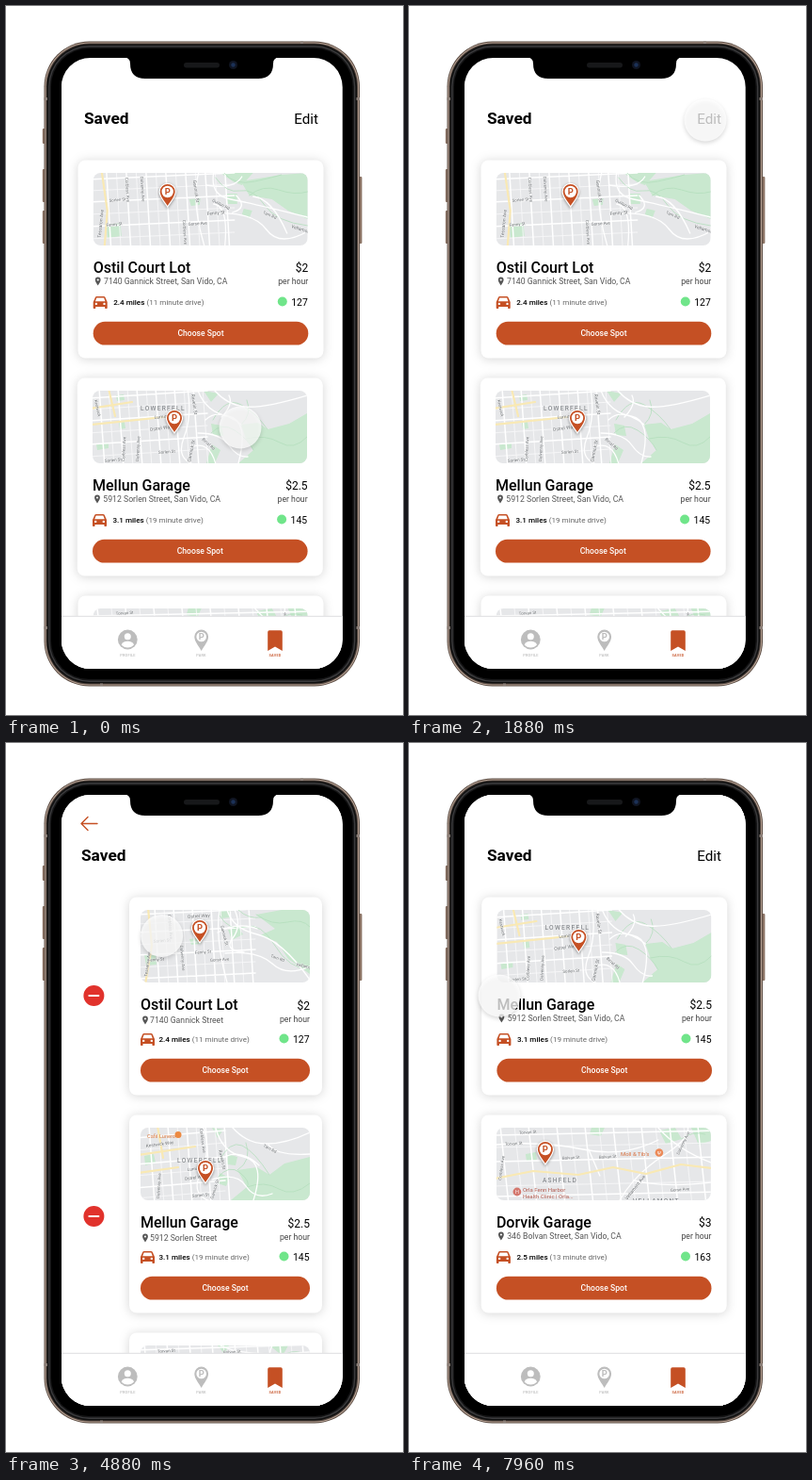
Recreate the animation shown at these times as an HTML page. Size 422 by 752 pixels, loop 8 s.

```html
<!DOCTYPE html>
<html lang="en">
<head>
<meta charset="utf-8">
<title>Saved parking</title>
<style>
html, body { margin: 0; width: 100%; height: 100%; overflow: hidden; background: #fff; }
svg { display: block; width: 100vw; height: 100vh; font-family: Roboto, Arial, sans-serif; }
.card { fill: #fff; filter: drop-shadow(0 1.5px 5.5px rgba(0,0,0,.17)); }
.pin { filter: drop-shadow(0 1px 1.5px rgba(0,0,0,.4)); }
.touch { filter: drop-shadow(0 2px 2px rgba(0,0,0,.2)); }
</style>
</head>
<body>
<svg id="stage" viewBox="0 0 422 752"></svg>
<script>
const ORANGE = '#c55024', GRAY = '#bdbdbd', PARK = '#c9e8cf', LOOP = 8000;

const text = (s, x, y, size, fill = '#000', extra = '') =>
  `<text x="${x}" y="${y}" font-size="${size}" fill="${fill}" ${extra}>${s}</text>`;
const box = (x, y, w, h, r, fill, extra = '') =>
  `<rect x="${x}" y="${y}" width="${w}" height="${h}" rx="${r}" fill="${fill}" ${extra}/>`;
const dot = (x, y, r, fill, extra = '') => `<circle cx="${x}" cy="${y}" r="${r}" fill="${fill}" ${extra}/>`;
const path = (d, fill, extra = '') => `<path d="${d}" fill="${fill}" ${extra}/>`;
const line = (d, color, width) =>
  path(d, 'none', `stroke="${color}" stroke-width="${width}" stroke-linejoin="round" stroke-linecap="round"`);
const at = (x, y, body, extra = '') => `<g transform="translate(${x} ${y})" ${extra}>${body}</g>`;
const END = 'text-anchor="end"', MID = 'text-anchor="middle"', MEDIUM = 'font-weight="500"', BOLD = 'font-weight="700"';

// ---- icons ----
const drop = (r, tip) => `M${-r} 0A${r} ${r} 0 1 1 ${r} 0C${r} ${r * .65} ${r * .4} ${tip * .65} 0 ${tip}C${-r * .4} ${tip * .65} ${-r} ${r * .65} ${-r} 0Z`;
const parkPin = (r, tip, color, extra) =>
  path(drop(r, tip), color, extra) + dot(0, 0, r * .72, '#fff') + text('P', 0, 3.4, 9.4, color, `${MID} ${BOLD}`);
const marker = (x, y) => at(x, y, parkPin(8.6, 16, ORANGE, 'stroke="#fff" stroke-width="1.2"'), 'class="pin"');
const smallPin = (x, y) => at(x, y, path(drop(2.9, 6), '#555') + dot(0, 0, 1.1, '#fff'));
const car = (x, y) => at(x, y,
  path('M0 6 2.2 1Q2.6 0 3.8 0H11.2Q12.4 0 12.8 1L15 6V12.2Q15 13 14.2 13H13.2Q12.4 13 12.4 12.2V11H2.6V12.2Q2.6 13 1.8 13H.8Q0 13 0 12.2Z', ORANGE) +
  path('M2.2 5.2 3.6 1.5H11.4L12.8 5.2Z', '#fff') + dot(3.2, 7.9, 1.2, '#fff') + dot(11.8, 7.9, 1.2, '#fff'));
const minus = (x, y) => dot(x, y, 11, '#e1322c') + box(x - 6, y - 1, 12, 2, 1, '#fff');

// ---- maps, each drawn in a 77 px high strip ----
const label = (s, x, y, turn = 0, size = 4.5, fill = '#62666a') =>
  text(s, x, y, size, fill, `transform="rotate(${turn} ${x} ${y})" stroke="#fff" stroke-width=".8" stroke-opacity=".7" paint-order="stroke"`);
const district = (s, x, y) => text(s, x, y, 6.6, '#74787c', 'letter-spacing="1.3"');

function grid(from, to, gap, tilt, rows, slope) {
  let minor = '', major = '';
  for (let x = from, i = 0; x < to; x += gap, i++) {
    const d = `M${x} -3l${tilt} 84`;
    i % 2 ? minor += d : major += d;
  }
  rows.forEach((y, i) => {
    const d = `M-5 ${y}L${to} ${y + slope}`;
    i % 2 ? minor += d : major += d;
  });
  return line(minor, '#f8f8f9', .9) + line(major, '#fff', 1.5);
}
const map = (w, parks, trails, streets, roads, main, labels, pin) => at(0, 0,
  box(0, 0, w, 77, 0, '#e6e7e9') + path(parks, PARK) + streets + line(trails, '#b4dfbd', .8) + line(roads, '#fff', 1.3) +
  line(main, '#f9e9b4', 2.2) + labels + marker(...pin), `clip-path="url(#clip${w})"`);

const maps = {
  courtWide: map(228,
    'M135 0H170L158 13 150 10ZM157 9L200 2 228 0V49L207 40 190 28 166 24ZM14 55L29 53 30 67 15 69ZM102 28L114 27 113 34 104 35ZM142 22H153V33H143ZM160 38L169 40 166 48 158 44Z',
    'M130 5Q142 22 156 19T182 34 228 56M166 24Q180 12 197 18T228 20M139 0Q150 14 172 9T200 2',
    grid(14, 150, 10.5, 5, [7, 19, 31, 44, 57, 70], -7),
    'M112 0Q104 30 118 77M128 0Q124 24 146 28T228 47M120 13Q150 18 158 4M130 43Q170 41 184 60T228 62M152 24Q165 37 148 42M170 25Q190 27 206 64M128 33Q144 35 140 77',
    'M9 -2 15 40 12 79',
    label('Tessaron Ave', 8, 69, -84, 5) + label('Sorlen St', 17, 31, -5) + label('Fenny St', 14, 57, -6) +
    label('Fenny St', 121, 45, -5, 5) + label('Gorse Ave', 101, 56, -4) + label('Corbless Ave', 34, 5, 86) +
    label('Dalvenny Ave', 50, 4, 86) + label('Gannick St', 106, 8, 82, 5) + label('Corbless Ave', 95, 50, 86) +
    label('Vellamont', 210, 58, 18, 5) + label('Tarn Rd', 180, 43, 24) + label('Quillon Rd', 126, 30, 28),
    [79, 20]),

  courtNarrow: map(180,
    'M123 5L150 0H180V68L157 52 145 34 127 27 143 20ZM84 0H96V8L85 9ZM93 21L104 19 109 26 97 32ZM4 48L16 46 17 58 6 59ZM52 31L65 29 64 36 54 37Z',
    'M84 6Q94 23 111 18T143 38 180 63M123 5Q140 17 156 13T180 18M104 0Q114 10 128 8',
    grid(15, 122, 10, 5, [5, 15, 24, 37, 48, 61, 73], -6),
    'M84 0Q79 30 92 77M92 0Q98 20 124 26T180 74M82 24Q102 12 124 20M90 46Q125 43 140 57T180 60M100 0Q108 17 98 30T110 45',
    'M8 -2 12 38 5 79',
    label('Ostrel Way', 50, 9, -4, 5) + label('Tessaron Ave', 7, 71, -82, 4.6) + label('Sorlen St', 14, 35, -5) +
    label('Fenny St', 58, 47, -5) + label('Fenny St', 8, 55, -5) + label('Gorse Ave', 74, 55, -4) +
    label('Gannick St', 85, 17, 76) + label('Corbless Ave', 29, 5, 85) + label('Dalvenny Ave', 42, 38, 85) +
    label('Vellamont', 165, 59, 14) + label('Tarn Rd', 138, 50, 20),
    [63, 19]),

  garageWide: map(228,
    'M158 36L176 34 186 41 209 35 228 24V77H155L171 63 163 51ZM118 0L134 3 126 12ZM126 35L137 37 139 48 128 47ZM25 5L33 4 34 10 26 11ZM28 34L34 33 35 40 29 41ZM4 57L17 55 17 61 5 63ZM127 57L136 63 130 77 121 77Z',
    'M128 31Q142 6 158 15T186 41M126 45Q137 33 151 42T171 63M158 36Q170 25 164 10M163 51Q184 46 199 55T228 49',
    grid(7, 122, 10, 6, [8, 20, 32, 45, 57, 70], -8),
    'M101 -2Q106 27 97 50T110 79M112 0Q121 23 144 27T155 77M120 31Q134 17 158 36M112 45Q136 45 145 58T165 70M130 0Q143 15 162 17T228 5M104 60Q124 52 131 78M145 5Q150 15 137 28',
    'M-2 19L42 12M17 -2 24 27M-2 36L76 28',
    label('Lumis St', 66, 30, -6, 5) + district('LOWERFELL', 51, 21) + label('Ostrel Way', 61, 43, -8, 5) +
    label('Ravelin St', 105, 4, 82, 5) + label('Gannick St', 104, 76, -78, 5) + label('Sorlen St', 70, 67, -4) +
    label('Corbless Ave', 34, 75, -87) + label('Dalvenny Ave', 49, 75, -87) + label('Sorlen St', 13, 76, -5) +
    label('Birral Rd', 116, 52, 42) + label('Kestwick', 2, 10, 78),
    [87, 29]),

  garageNarrow: map(180,
    'M103 45L124 42 137 50 153 38 180 31V77H96L113 63ZM76 0L88 2 82 11ZM93 28L103 31 101 40 92 39ZM4 30L14 28 16 37 5 40ZM84 48L95 53 91 62 82 59Z',
    'M83 36Q95 13 108 19T137 50M82 53Q94 38 106 48T113 63M103 45Q119 35 112 16M113 63Q132 56 147 65T180 59',
    grid(9, 90, 10, 6, [11, 24, 39, 51, 64, 75], -8),
    'M66 -2Q76 24 64 48T77 79M80 0Q86 26 110 31T119 80M80 37Q103 18 126 40M76 55Q102 47 112 62T140 70M98 0Q113 17 134 17T180 5M136 18Q144 30 180 28',
    'M-2 29L58 20M18 -2 24 32M-2 48 40 42',
    text('Café Lunero', 7, 11, 5.6, '#d9783f') + dot(40, 7.5, 3.5, '#ec8a42') + label('Kestwick Way', 6, 21, -8, 4.8) +
    district('LOWERFELL', 39, 37) + label('Lumis St', 50, 46, -6, 4.8) + label('Ostrel Way', 47, 56, -8, 4.8) +
    label('Ravelin St', 83, 24, 78, 4.8) + label('Corbless Ave', 63, 1, 83) + label('Dalvenny Ave', 20, 75, -86) +
    label('Sorlen St', 55, 74, -5) + label('Gannick St', 77, 76, -72) + label('Tarn Rd', 130, 20, 28),
    [69, 43]),

  thirdWide: map(228,
    'M101 0H115L111 9 99 7ZM173 3L190 0 197 12 180 17ZM207 0H228V14L215 18ZM31 28L42 26 43 34 32 35Z',
    'M197 12Q208 3 222 7',
    grid(4, 235, 15, 9, [8, 21, 36, 62, 73], -5),
    'M130 79Q146 50 177 30T203 -2M172 0Q192 23 228 37M0 18Q49 14 92 23T172 13M146 56Q178 64 230 58M98 23 110 51',
    'M-2 54 39 46 87 50 124 42 159 49 196 39 230 43',
    label('Torvan St', 9, 19, -4) + label('Torvan St', 24, 7, -4) + label('Bolvan St', 70, 34, -4) +
    label('Bolvan St', 109, 33, -4) + label('Vellamont Ave', 139, 77, -52, 5) + label('Corbless Ave', 5, 56, -82) +
    label('Dalvenny Ave', 194, 29, -64) + label('Gorse Ave', 185, 68, -5) + district('ASHFELD', 49, 57.5) +
    district('VELLAMONT', 145, 80) + text('Moll &amp; Tib’s', 132, 30, 6, '#d8703f') + dot(173, 26.5, 4.3, '#ec8a58') +
    text('Ψ', 173, 29, 5.5, '#fff', MID) + text('Orla Fenn Harbor', 28, 68, 6, '#b25b50') +
    text('Health Clinic | Orla...', 28, 75, 6, '#b25b50') + dot(22, 68, 4.4, '#d4776d') + text('H', 22, 70, 5.5, '#fff', MID),
    [52, 23]),

  thirdNarrow: map(180,
    'M82 0H94L89 9ZM137 0H157L151 11Z', 'M151 11Q160 4 172 8',
    grid(4, 185, 12, 7, [5, 19, 34], -6), 'M85 0Q109 13 180 7M140 0Q135 9 139 20', 'M-2 55 182 43',
    label('Torvan St', 18, 8, -4) + label('Bolvan St', 88, 9, -4), [41, 48])
};

// ---- cards ----
const spots = [
  { name: 'Ostil Court Lot', street: '7140 Gannick Street', price: '$2', miles: '2.4', mins: 11, free: 127, map: 'court' },
  { name: 'Mellun Garage', street: '5912 Sorlen Street', price: '$2.5', miles: '3.1', mins: 19, free: 145, map: 'garage' },
  { name: 'Dorvik Garage', street: '346 Bolvan Street', price: '$3', miles: '2.5', mins: 13, free: 163, map: 'third' }
];

function card(spot, row, narrow, dx = 0) {
  const w = narrow ? 180 : 228, left = narrow ? 143 : 92.7, right = narrow ? 323 : 321.3;
  const low = narrow ? 2 : 0, frame = narrow ? [131, 205] : [76.5, 261];
  return at(dx, row * 231,
    box(frame[0], 163.5, frame[1], 210, 8, '#fff', 'class="card"') +
    at(left, 177, maps[spot.map + (narrow ? 'Narrow' : 'Wide')]) +
    text(spot.name, left, 283, 16, '#000', MEDIUM) +
    smallPin(left + 5, 290.5 + low) +
    text(spot.street + (narrow ? '' : ', San Vido, CA'), left + (narrow ? 10 : 11.3), 295 + low, 8.7, '#555') +
    text(spot.price, right, 282 + low / 2, 12, '#000', END) +
    text('per hour', right, 295 + low / 2, 8.7, '#444', END) +
    car(left, 308) +
    text(`${spot.miles} miles <tspan fill="#666" font-weight="400">(${spot.mins} minute drive)</tspan>`,
      left + (narrow ? 19.5 : 21.5), 317, 8.1, '#000', MEDIUM) +
    dot(right - 27.5, 313.5, 5, '#70e58a') + text(spot.free, right - .5, 317.5, 10.4, '#000', END) +
    box(left, 334.8, right - left, 24.8, 12.4, ORANGE) +
    text('Choose Spot', (left + right) / 2, 350.4, 8.6, '#fff', `${MID} ${MEDIUM}`));
}

const page = box(59, 55, 299, 649, 0, '#fff');
const saved = x => text('Saved', x, 125, 17.3, '#000', BOLD);
const edit = text('Edit', 332, 125, 15.2, '#000', END);
const listView = page + saved(83) + edit +
  card(spots[0], 0, false) + card(spots[1], 1, false, -.7) + card(spots[2], 2, false);
const editView = page + saved(80) + line('M97 85.5H80M87 78.5 80 85.5 87 92.5', ORANGE, 1.4) +
  spots.map((s, i) => card(s, i, true)).join('') + minus(93.4, 268) + minus(93.4, 502);
const resultView = page + saved(83) + edit + card(spots[1], 0, false, .7) + card(spots[2], 1, false, .2);

const tab = (s, x, color) => text(s, x, 690, 3.9, color, `${MID} ${MEDIUM} letter-spacing=".2"`);
const tabBar = box(59, 647, 299, 60, 0, '#fff') + box(59, 646.8, 299, .9, 0, '#d9d9dc') +
  dot(129.3, 672, 10.4, GRAY) + dot(129.3, 668.8, 3.5, '#fff') + path('M122.7 677.5Q124 673.8 129.3 673.8T136 677.5Q133.5 680.5 129.3 680.5T122.7 677.5Z', '#fff') +
  at(207.7, 669, parkPin(7.4, 15, GRAY, '')) +
  path('M278.2 664Q278.2 662.3 280 662.3H292Q293.8 662.3 293.8 664V684L286 679.5 278.2 684Z', ORANGE) +
  tab('PROFILE', 129.5, GRAY) + tab('PARK', 207.5, GRAY) + tab('SAVED', 286, ORANGE);

// ---- phone: nested shells, each an inset and a colour ----
const shells = [[0, '#57483f'], [.9, '#b7a294'], [2, '#4a3f39'], [3, '#111'], [4.6, '#3b3b3d'], [6, '#161617'], [7.5, '#000']];
const body = [[38.8, 130, 16], [38.8, 173, 35], [38.8, 217, 35], [375, 181, 71]]
  .map(([x, y, h]) => box(x, y, 3.4, h, 1, '#8b7364')).join('') +
  shells.map(([inset, fill]) =>
    box(40.5 + inset, 37.5 + inset, 335.5 - 2 * inset, 684 - 2 * inset, 48 - inset, fill)).join('') +
  [[40.5, 97], [372.5, 97], [40.5, 658], [372.5, 658]].map(([x, y]) => box(x, y, 3.5, 3, 0, '#8c8079')).join('') +
  box(100, 718.5, 3, 2.5, 0, '#8c8079') + box(313, 37.5, 3, 2.5, 0, '#8c8079');
const notch = path('M126 54.5Q132 55 132 61Q132 77 148 77H268Q284 77 284 61Q284 55 290 54.5Z', '#000') +
  box(189, 60, 38, 5.5, 2.7, '#17181a') + dot(241.5, 62.5, 4.5, '#101522') + dot(241.5, 62.5, 2.2, '#1c3157');

const clip = (id, x, y, w, h, r) => `<clipPath id="${id}">${box(x, y, w, h, r, '#000')}</clipPath>`;
const stage = document.getElementById('stage');
stage.innerHTML = `<defs>${clip('clip228', 0, 0, 228, 77, 8) + clip('clip180', 0, 0, 180, 77, 8) + clip('screen', 58.7, 55, 299, 648, 31)}</defs>` +
  body + `<g clip-path="url(#screen)">${listView}<g id="editing">${editView}</g><g id="result">${resultView}</g>${tabBar}</g>` + notch +
  '<g id="touch"><circle class="touch" r="22.5" fill="#fff" fill-opacity=".74"/></g>';

// ---- motion ----
const [editing, result, touch] = ['editing', 'result', 'touch'].map(id => document.getElementById(id));
const progress = (t, start, length) => Math.min(1, Math.max(0, (t - start) / length));
const easeInOut = p => p < .5 ? 2 * p * p : 1 - 2 * (1 - p) ** 2;
const easeOut = p => 1 - (1 - p) ** 2;
const curve = (points, u) => [0, 1].map(i =>
  (1 - u) ** 2 * points[0][i] + 2 * u * (1 - u) * points[1][i] + u * u * points[2][i]);
const toEdit = [[249, 447], [249, 284], [315, 121]];
const toRemove = [[315, 121], [182, 174], [96, 268]];
const MOVE = 1560, PRESS = 360, FADE = 440;

function show(element, opacity) {
  element.setAttribute('opacity', opacity);
  element.setAttribute('display', opacity ? 'inline' : 'none');
}

function draw(t) {
  const [x, y] = t < 3990 ? curve(toEdit, easeInOut(progress(t, 0, MOVE)))
    : curve(toRemove, easeInOut(progress(t, 3990, MOVE)));
  const press = Math.sin(Math.PI * progress(t, 2160, PRESS)) + Math.sin(Math.PI * progress(t, 6060, PRESS));
  touch.setAttribute('transform', `translate(${x} ${y}) scale(${1 - .07 * press})`);
  show(editing, easeOut(progress(t, 2460, FADE)));
  show(result, easeOut(progress(t, 6360, FADE)));
}

const start = performance.now();
function tick() {
  draw((performance.now() - start) % LOOP);
  requestAnimationFrame(tick);
}
tick();
</script>
</body>
</html>
```
